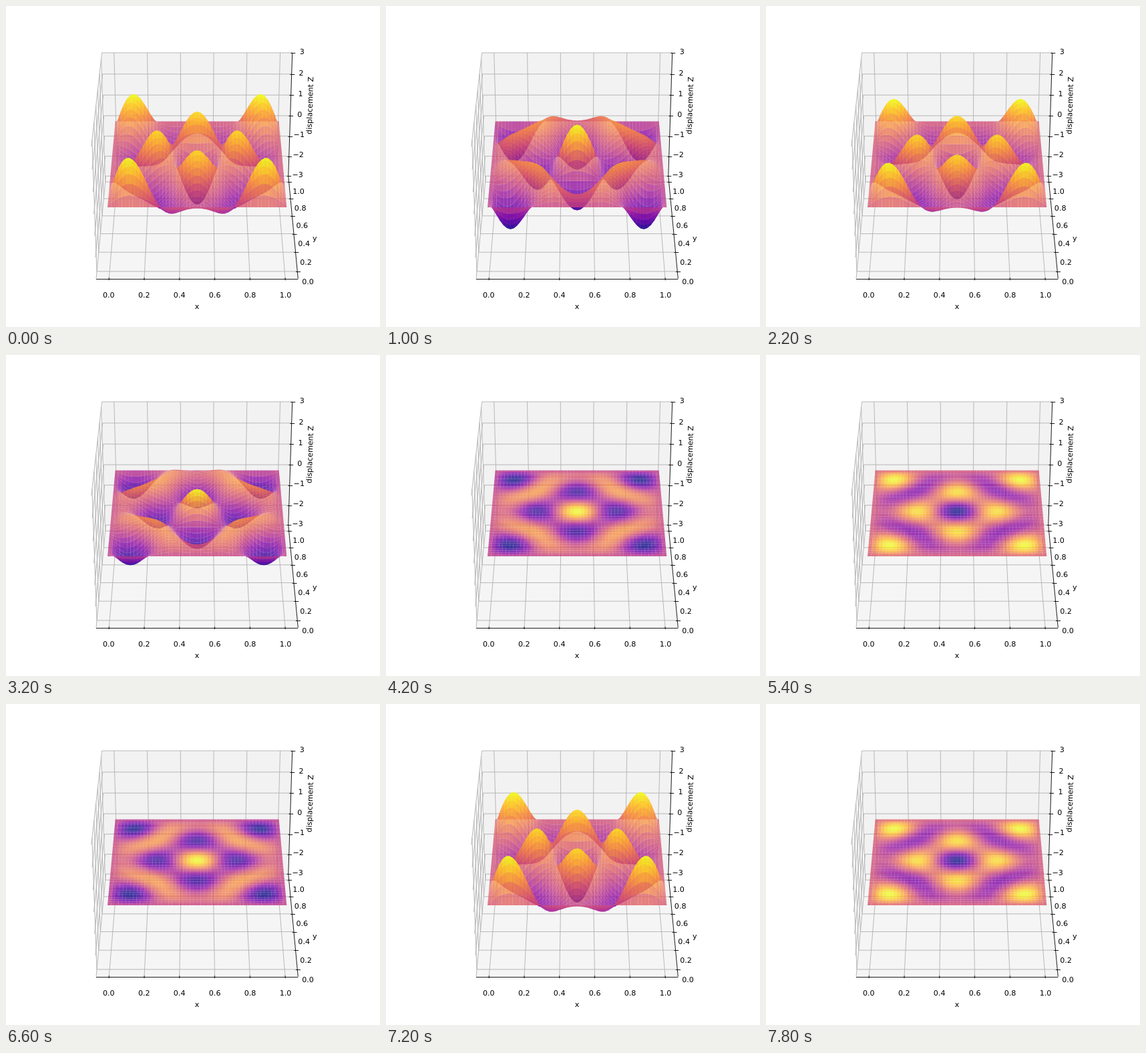
Recreate the animation shown at these times as an HTML page with a canvas. Size 560 by 480 pixels, loop 8 s.

```html
<!DOCTYPE html>
<html lang="en">
<head>
<meta charset="utf-8">
<title>Vibrating membrane</title>
<style>
  html, body { margin: 0; width: 100%; height: 100%; overflow: hidden; background: #fff; }
  svg, canvas { position: absolute; left: 0; top: 0; width: 560px; height: 480px; }
  text { font: 11.11px "DejaVu Sans", sans-serif; text-anchor: middle; }
  .grid { fill: none; stroke: #b0b0b0; stroke-width: .89; }
  .axis { fill: none; stroke: #000; stroke-width: .89; }
</style>
</head>
<body>
<svg id="plot" viewBox="0 0 560 480"></svg>
<canvas id="surface" width="560" height="480"></canvas>
<script>
const STEP = 200, STEPS = 40, CELLS = 50, ALPHA = 0.8;
const LO = -0.0729, HI = 1.0729, ZMAX = 3;
const SIDE = 1.1905, HEIGHT = 0.8929;
const DISTANCE = 10, SCALE = 2464.86, CX = 286.16, CY = 233.84;
const COS = Math.cos(Math.PI / 6), SIN = 0.5;

// Perspective camera facing +y, raised by 30 degrees: [screen x, screen y, depth]
function project(x, y, z) {
  const across = ((x - LO) / (HI - LO) - 0.5) * SIDE;
  const away = ((y - LO) / (HI - LO) - 0.5) * SIDE;
  const up = z / (2 * ZMAX) * HEIGHT;
  const depth = DISTANCE + away * COS - up * SIN;
  const k = SCALE / depth;
  return [CX + across * k, CY - (up * COS + away * SIN) * k, depth];
}

const svg = document.getElementById('plot');

function add(tag, attrs, content = '') {
  const el = document.createElementNS('http://www.w3.org/2000/svg', tag);
  for (const name in attrs) el.setAttribute(name, attrs[name]);
  el.textContent = content;
  svg.appendChild(el);
}

const toScreen = corners => corners.map(c => project(...c).slice(0, 2));
const toPoints = points => points.map(p => p.map(v => v.toFixed(2)).join()).join(' ');
const pane = (fill, ...corners) => add('polygon', { points: toPoints(toScreen(corners)), fill });
const line = (kind, ...corners) => add('polyline', { points: toPoints(toScreen(corners)), class: kind });

// Level segments sit on whole pixel rows
function levelLine(...corners) {
  const points = toScreen(corners).map(([x, y]) => [x, Math.round(y) + 0.5]);
  add('polyline', { points: toPoints(points), class: 'axis' });
}

const label = (x, y, content) => add('text', { x, y: Math.round(y) }, content);

function tickLabel(content, ...corner) {
  const [x, top] = project(...corner);
  label(x, top + 8.8, content);
}

function drawAxes() {
  const A = [LO, LO, -ZMAX], B = [HI, LO, -ZMAX], C = [HI, HI, -ZMAX], D = [LO, HI, -ZMAX];
  const topA = [LO, LO, ZMAX], topC = [HI, HI, ZMAX], topD = [LO, HI, ZMAX];
  pane('#f9f9f9', A, D, topD, topA);
  pane('#f2f2f2', D, C, topC, topD);
  pane('#f5f5f5', A, B, C, D);

  const ticks = [0, 0.2, 0.4, 0.6, 0.8, 1], heights = [-3, -2, -1, 0, 1, 2, 3];
  for (const v of ticks) line('grid', [v, HI, ZMAX], [v, HI, -ZMAX], [v, LO, -ZMAX]);
  for (const v of ticks) line('grid', [LO, v, ZMAX], [LO, v, -ZMAX], [HI, v, -ZMAX]);
  for (const z of heights) line('grid', [LO, LO, z], [LO, HI, z], [HI, HI, z]);
  levelLine(A, B);
  line('axis', B, C, topC);

  const inner = 0.0092, outer = 0.0183;
  const gap = 0.0538, sideGap = gap * (HI - LO), below = -ZMAX * (1 + 2 * gap);
  for (const v of ticks) {
    const name = v.toFixed(1);
    line('axis', [v, LO + inner, -ZMAX], [v, LO - outer, -ZMAX]);
    tickLabel(name, v, LO - sideGap, below);
    levelLine([HI - inner, v, -ZMAX], [HI + outer, v, -ZMAX]);
    tickLabel(name, HI + sideGap, v, below);
  }
  for (const z of heights) {
    levelLine([HI - inner, HI, z], [HI + outer, HI, z]);
    tickLabel(String(z).replace('-', '\u2212'), HI + sideGap, HI + sideGap, z);
  }
  label(286, 453, 'x');
  label(462.3, 351, 'y');
  add('text', { transform: 'translate(458.9 148.9) rotate(-88.2)' }, 'displacement Z');
}

const PLASMA = [
  [13, 8, 135], [65, 4, 157], [106, 0, 168], [143, 13, 164], [177, 42, 144], [204, 71, 120],
  [225, 100, 98], [242, 132, 75], [252, 166, 54], [252, 206, 37], [240, 249, 33]
];

function plasma(v) {
  const i = Math.min(9, Math.floor(v * 10)), f = v * 10 - i;
  const rgb = PLASMA[i].map((c, n) => Math.round(c + (PLASMA[i + 1][n] - c) * f));
  return `rgba(${rgb},${ALPHA})`;
}

const wave = (n, v) => Math.sin(n * Math.PI * v);
const mode = (x, y) => wave(3, x) * wave(5, y) + wave(5, x) * wave(3, y);
const ctx = document.getElementById('surface').getContext('2d');

function drawSurface(amplitude) {
  const nodes = [];
  for (let j = 0; j <= CELLS; j++) {
    nodes.push([]);
    for (let i = 0; i <= CELLS; i++) {
      const x = i / CELLS, y = j / CELLS, z = amplitude * mode(x, y);
      nodes[j].push({ z, at: project(x, y, z) });
    }
  }
  const faces = [];
  let min = Infinity, max = -Infinity;
  for (let j = 0; j < CELLS; j++) {
    for (let i = 0; i < CELLS; i++) {
      const quad = [nodes[j][i], nodes[j][i + 1], nodes[j + 1][i + 1], nodes[j + 1][i]];
      const z = quad.reduce((sum, p) => sum + p.z, 0) / 4;
      const depth = quad.reduce((sum, p) => sum + p.at[2], 0);
      min = Math.min(min, z);
      max = Math.max(max, z);
      faces.push({ quad, z, depth });
    }
  }
  // Far faces first; colours span the current range of heights
  faces.sort((a, b) => b.depth - a.depth);
  ctx.clearRect(0, 0, 560, 480);
  for (const { quad, z } of faces) {
    ctx.fillStyle = plasma((z - min) / (max - min));
    ctx.beginPath();
    for (const p of quad) ctx.lineTo(p.at[0], p.at[1]);
    ctx.fill();
  }
}

let shown = -1;
const start = performance.now();

function tick() {
  const step = Math.floor(Math.max(0, performance.now() - start) / STEP) % STEPS;
  if (step !== shown) {
    shown = step;
    drawSurface(Math.cos((step % 12) * Math.PI / 6));
  }
  requestAnimationFrame(tick);
}

drawAxes();
tick();
</script>
</body>
</html>
```
